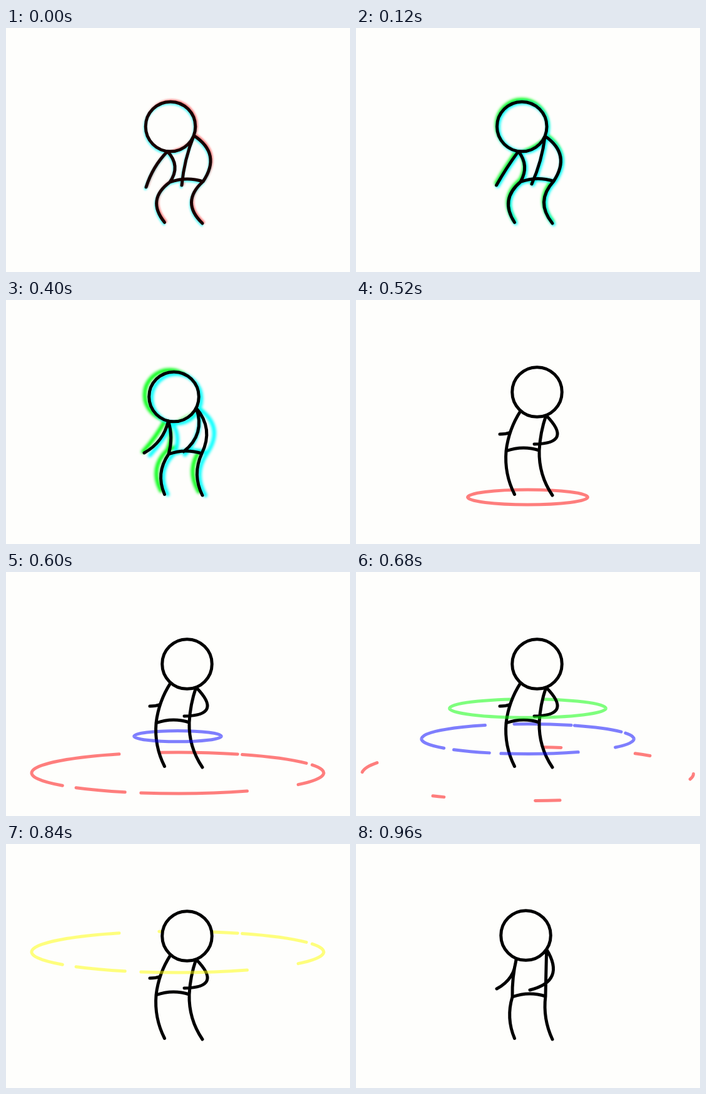
Write an HTML page with a canvas that moves like this. It is 550 px wide and 391 px high and loops after 1000 ms.

```html
<!DOCTYPE html>
<html lang="en">
<head>
<meta charset="utf-8">
<title>Power up</title>
<style>
html, body { margin: 0; width: 100%; height: 100%; overflow: hidden; background: #fefefc; }
canvas { display: block; }
</style>
</head>
<body>
<canvas id="stage" width="550" height="391"></canvas>
<script>
const ctx = document.getElementById('stage').getContext('2d');
const paper = '#fefefc', TAU = 2 * Math.PI;
ctx.lineCap = ctx.lineJoin = 'round';

// Pose: head, shoulder angles on the head, left hand, right hand, left hip,
// then how far the arms, torso sides and legs bow to the right
const crouch = [[263, 158], [97, 21], [224, 255], [281, 252], [262, 247], [-4, -3], [10, 19], [-17, -18]];
const charge = [[267.5, 158], [99, 24], [225, 249], [281, 248], [264, 246], [2, 9], [6.5, 17], [-12, -11]];
const rise = [[268.5, 155], [103, 27], [221, 245], [284, 243], [260, 247], [7, 13], [4, 12], [-9, -8]];
const burst = [[289.5, 147.5], [131, 69], [230, 215], [285, 231], [240, 242], [14, 29], [-4, -2], [-5, -6]];
const settle = [[271.5, 146.5], [112, 34], [225, 232], [278, 234], [250, 245], [8, 24], [-2, 0], [-6, -5]];
const feet = [[253.5, 311.5], [314, 313]];

const poses = [[0, crouch], [240, charge], [400, rise], [440, rise],
  [520, burst], [880, burst], [960, settle], [1000, crouch]];

const mix = (a, b, k) => Array.isArray(a) ? a.map((v, i) => mix(v, b[i], k)) : a + (b - a) * k;

function at(keys, t) {
  let i = 1;
  while (i < keys.length - 1 && t > keys[i][0]) i++;
  const [t0, a] = keys[i - 1], [t1, b] = keys[i];
  return mix(a, b, Math.max(0, Math.min(1, (t - t0) / (t1 - t0))));
}

// Continues the path to b as an arc bowed sideways
function bow(a, b, depth) {
  const dx = b[0] - a[0], dy = b[1] - a[1], k = 2 * depth / Math.hypot(dx, dy);
  ctx.quadraticCurveTo(a[0] + dx / 2 + dy * k, a[1] + dy / 2 - dx * k, ...b);
}

function figure(pose, { color = '#000', fill, width = 5, shift = [0, 0], blur = 0 }) {
  const [head, turn, handL, handR, hipL, arms, sides, legs] = pose;
  const [shL, shR] = turn.map(d => d * TAU / 360)
    .map(a => [head[0] + 40 * Math.cos(a), head[1] + 40 * Math.sin(a)]);
  const hipR = [hipL[0] + 53, hipL[1] - 1];

  const arm = (from, to, depth) => { ctx.moveTo(...from); bow(from, to, depth); };
  const trunk = () => {
    ctx.moveTo(...shL);
    bow(shL, hipL, sides[0]);
    bow(hipL, hipR, 4.5);
    bow(hipR, shR, -sides[1]);
  };
  const skull = () => { ctx.moveTo(head[0] + 39.8, head[1]); ctx.arc(...head, 39.8, 0, TAU); };
  const path = (...steps) => { ctx.beginPath(); steps.forEach(f => f()); };

  ctx.save();
  ctx.translate(...shift);
  if (blur) ctx.filter = `blur(${blur}px)`;
  ctx.strokeStyle = color;
  ctx.fillStyle = paper;
  ctx.lineWidth = width;
  path(() => arm(shL, handL, arms[0]));
  ctx.stroke();
  if (fill) {
    path(skull, trunk);
    ctx.fill();
  }
  path(skull, trunk, () => {
    arm(shR, handR, arms[1]);
    arm(hipL, feet[0], legs[0]);
    arm(hipR, feet[1], legs[1]);
  });
  ctx.stroke();
  ctx.restore();
}

function glow(t) {
  const early = t < 120, pose = at(poses, Math.min(t, 240));
  const look = { fill: true, width: early ? 5 : 6, blur: early ? 1.5 : 2 };
  figure(pose, { ...look, color: early ? '#f77' : '#0f1',
    shift: at([[0, [1.5, -1.5]], [240, [-2, -5]], [400, [-6, -6]]], t) });
  figure(pose, { ...look, color: early ? '#6ff' : '#0ff',
    shift: at([[0, [-1, 2.5]], [240, [5, 0]]], t) });
}

// Ring by age: [lift, half width, half height]; it cracks into arcs [middle, length] that shrink
const growth = [[-80, [-6, 96, 12]], [-40, [0, 216, 25.5]], [0, [0, 233.5, 33]], [80, [1.5, 265, 43]]];
const arcs = [[.1, 1], [1.45, .75], [2.14, .4], [3.39, 1.82], [4.86, .55], [5.48, .62]];
const rings = [
  { peak: 600, y: 322, size: 1, color: '#ff000080' },
  { peak: 680, y: 267.5, size: .727, color: '#0000ff80' },
  { peak: 720, y: 218.5, size: .579, color: '#00ff0080' },
  { peak: 840, y: 173, size: 1, color: '#ffff0080' }];

function ring({ peak, y, size, color }, t, far) {
  const age = t - peak;
  if (Math.abs(age) > 80) return;
  const [lift, rx, ry] = at(growth, age).map(v => v * size);
  const cy = y + lift;
  ctx.save();
  ctx.beginPath();
  ctx.rect(0, far ? 0 : cy, 550, far ? cy : 391);
  ctx.clip();
  ctx.strokeStyle = color;
  ctx.lineWidth = 5;
  for (const [mid, length] of age < 0 ? [[0, TAU]] : arcs) {
    const half = length / 2 * (1 - .8 * Math.max(0, age) / 80);
    ctx.beginPath();
    ctx.ellipse(274.5, cy, rx, ry, 0, mid - half, mid + half);
    ctx.stroke();
  }
  ctx.restore();
}

function draw(now) {
  const t = Math.floor(now % 1000 / 40) * 40;
  const charging = t < 480;
  ctx.fillStyle = paper;
  ctx.fillRect(0, 0, 550, 391);
  if (charging) glow(t);
  rings.forEach(r => ring(r, t, true));
  figure(at(poses, t), { color: t < 120 ? '#180000' : '#000', fill: !charging });
  rings.forEach(r => ring(r, t, false));
}

let start;
function tick(now) {
  start ??= now;
  draw(now - start);
  requestAnimationFrame(tick);
}
requestAnimationFrame(tick);
</script>
</body>
</html>
```
